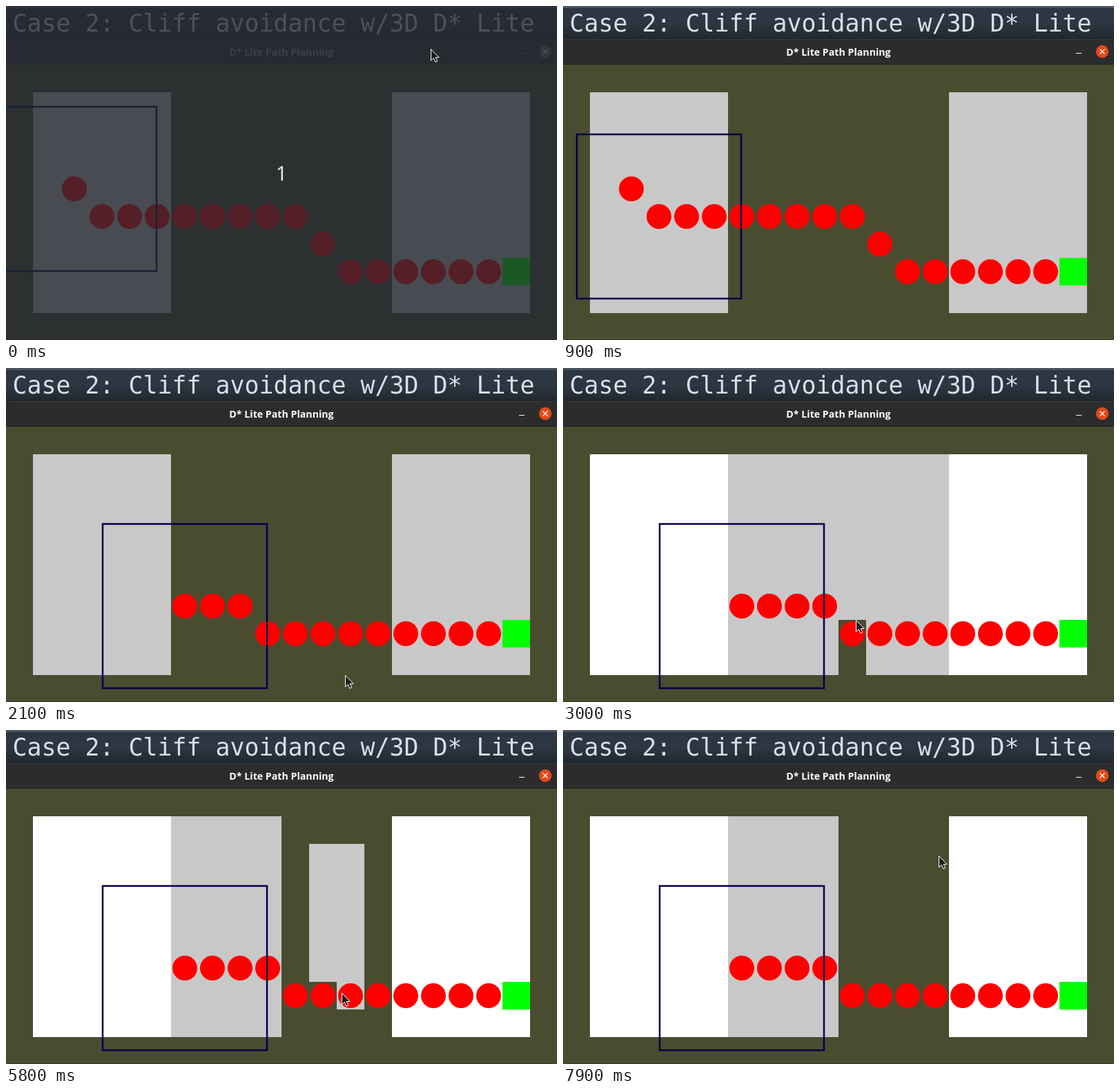
An HTML page with a canvas that plays this animation: 798x484 px, repeating every 8 s.

```html
<!DOCTYPE html>
<html lang="en">
<head>
<meta charset="utf-8">
<title>D* Lite Path Planning</title>
<style>
html, body { margin: 0; width: 100%; height: 100%; overflow: hidden; background: #4a4c30; }
canvas { display: block; }
</style>
</head>
<body>
<canvas id="stage" width="798" height="484"></canvas>
<script>
const ctx = document.getElementById('stage').getContext('2d');
const LOOP = 8000, TICK = 100, CELL = 40, LEFT = 39, TOP = 125;
const OLIVE = '#4a4c30', GRAY = '#c8c8c8';

// Ticks at which things happen
const HIDE = 6, REPLAN = 12, RAISE = 24, ERASE = 26, WEAVE = 56, WEAVE_END = 76;
const robotSteps = [0, 9, REPLAN, 16, 21];

// Corners of the pointer's route: tick, column, row
const corners = [
  [REPLAN, 17.85, 7], [20, 11.65, 8.03], [ERASE, 9.6, 7.9], [30, 9.63, 6], [37, 9.63, 0.4],
  [44, 12.5, 0.72], [50, 12.5, 7.8], [WEAVE, 10.4, 7], [WEAVE_END, 10.4, 1], [79, 12.62, 1.42]
];

// Pointer position in cells; it weaves over two columns while clearing the last block
function pointerAt(tick) {
  if (tick < HIDE) return [14.4, -1.57];
  if (tick < REPLAN) return null;
  const i = Math.max(1, corners.findIndex(k => k[0] >= tick));
  const [t0, c0, r0] = corners[i - 1], [t1, c1, r1] = corners[i];
  const p = (tick - t0) / (t1 - t0);
  const row = r0 + (r1 - r0) * p;
  const weaving = tick > WEAVE && tick < WEAVE_END;
  return [weaving ? 11 - 0.6 * Math.cos(Math.PI * (7 - row)) : c0 + (c1 - c0) * p, row];
}

// Cells swept by the pointer, each with the tick when it was reached
const erased = new Map();
for (let tick = ERASE; tick < 79; tick += 0.05) {
  const key = pointerAt(tick).map(Math.floor).join();
  if (!erased.has(key)) erased.set(key, tick);
}

// A path ends in row 6 and drops one row at each listed column
const pathAt = tick => tick < REPLAN ? [2, 10, 11] : tick < RAISE ? [5, 8] : [9];
const rowAt = (path, col) => 6 - path.filter(drop => drop > col).length;

function rect(color, x, y, w, h) {
  ctx.fillStyle = color;
  ctx.fillRect(x, y, w, h);
}

function cells(color, col, row, cols = 1, rows = 1) {
  rect(color, LEFT + col * CELL, TOP + row * CELL, cols * CELL, rows * CELL);
}

function disc(color, x, y, r) {
  ctx.fillStyle = color;
  ctx.beginPath();
  ctx.arc(x, y, r, 0, Math.PI * 2);
  ctx.fill();
}

function text(str, x, y, font, color, align = 'left') {
  ctx.font = font;
  ctx.fillStyle = color;
  ctx.textAlign = align;
  ctx.fillText(str, x, y);
}

const mix = (a, b, p) => `rgb(${a.map((v, i) => Math.round(v + (b[i] - v) * p))})`;

function drawHeading(focus) {
  rect('#2d3741', 0, 0, 798, 60);
  rect('#4a5663', 0, 0, 798, 3);
  const shadow = ctx.createLinearGradient(0, 26, 0, 48);
  shadow.addColorStop(0, 'rgba(0,0,0,0)');
  shadow.addColorStop(1, `rgba(0,0,0,${0.15 + 0.15 * focus})`);
  rect(shadow, 0, 26, 798, 22);
  text('Case 2: Cliff avoidance w/3D D* Lite', 9.6, 37, '34.88px "DejaVu Sans Mono", monospace', '#d8dee9');
}

function drawTitleBar(focus) {
  ctx.fillStyle = mix([50, 50, 50], [44, 44, 44], focus);
  ctx.beginPath();
  ctx.roundRect(0, 48, 798, 37, [6, 6, 0, 0]);
  ctx.fill();
  rect('#3c3c3c', 5, 48, 788, 1);
  rect('#1e1e1e', 0, 84, 798, 1);
  const ink = mix([146, 146, 146], [255, 255, 255], focus);
  text('D* Lite Path Planning', 399, 72, 'bold 14.2px "Open Sans", "Noto Sans", sans-serif', ink, 'center');
  rect(ink, 743, 68, 8, 1);
  disc(mix([100, 100, 100], [224, 73, 26], focus), 781, 66, 9.2);
  ctx.strokeStyle = '#fff';
  ctx.lineWidth = 1.4;
  ctx.beginPath();
  ctx.moveTo(777.5, 62.5); ctx.lineTo(784.5, 69.5);
  ctx.moveTo(784.5, 62.5); ctx.lineTo(777.5, 69.5);
  ctx.stroke();
}

function drawMap(tick) {
  const raised = tick >= RAISE;
  rect(OLIVE, 0, 85, 798, 399);
  rect('#3a3b2a', 0, 483, 798, 1);
  for (const col of [0, 13]) cells(raised ? '#fff' : GRAY, col, 0, 5, 8);
  if (raised) cells(GRAY, 5, 0, 8, 8);
  for (const [key, reached] of erased) {
    if (reached <= tick - 1) cells(OLIVE, ...key.split(',').map(Number));
  }
}

function drawRoute(tick) {
  const path = pathAt(tick);
  const col = robotSteps.filter(step => step <= tick).length;
  const row = rowAt(path, col);
  for (let c = tick < REPLAN ? 1 : col; c < 17; c++) {
    disc('#f00', LEFT + (c + 0.5) * CELL, TOP + (rowAt(path, c) + 0.5) * CELL, 18);
  }
  cells('#0f0', 17, 6);
  ctx.strokeStyle = '#00004b';
  ctx.lineWidth = 2.5;
  ctx.strokeRect(LEFT + col * CELL - 99, TOP + row * CELL - 99, 238, 238);
}

function drawPointer(tick) {
  const pos = pointerAt(tick);
  if (!pos) return;
  ctx.save();
  ctx.translate(Math.round(LEFT + pos[0] * CELL) + 0.5, Math.round(TOP + pos[1] * CELL) + 0.5);
  const arrow = new Path2D('M0 0V16.5L3.8 13L6.4 18.8L9.2 17.5L6.7 12H11.6Z');
  ctx.fillStyle = '#1c1c1c';
  ctx.fill(arrow);
  ctx.strokeStyle = '#fff';
  ctx.lineWidth = 1;
  ctx.stroke(arrow);
  ctx.restore();
}

function draw(now) {
  const tick = Math.floor((now % LOOP) / TICK);
  const focus = Math.min(1, Math.max(0, (tick - 2) / 2));
  drawHeading(focus);
  drawTitleBar(focus);
  drawMap(tick);
  drawRoute(tick);
  if (tick === 0) {
    rect('rgba(36,40,49,.78)', 0, 0, 798, 484);
    text('1', 399, 253, '29px "Noto Sans", "Open Sans", sans-serif', '#e4e4e4', 'center');
  }
  drawPointer(tick);
}

const begin = performance.now();
function frame() {
  draw(performance.now() - begin);
  requestAnimationFrame(frame);
}
frame();
</script>
</body>
</html>
```
